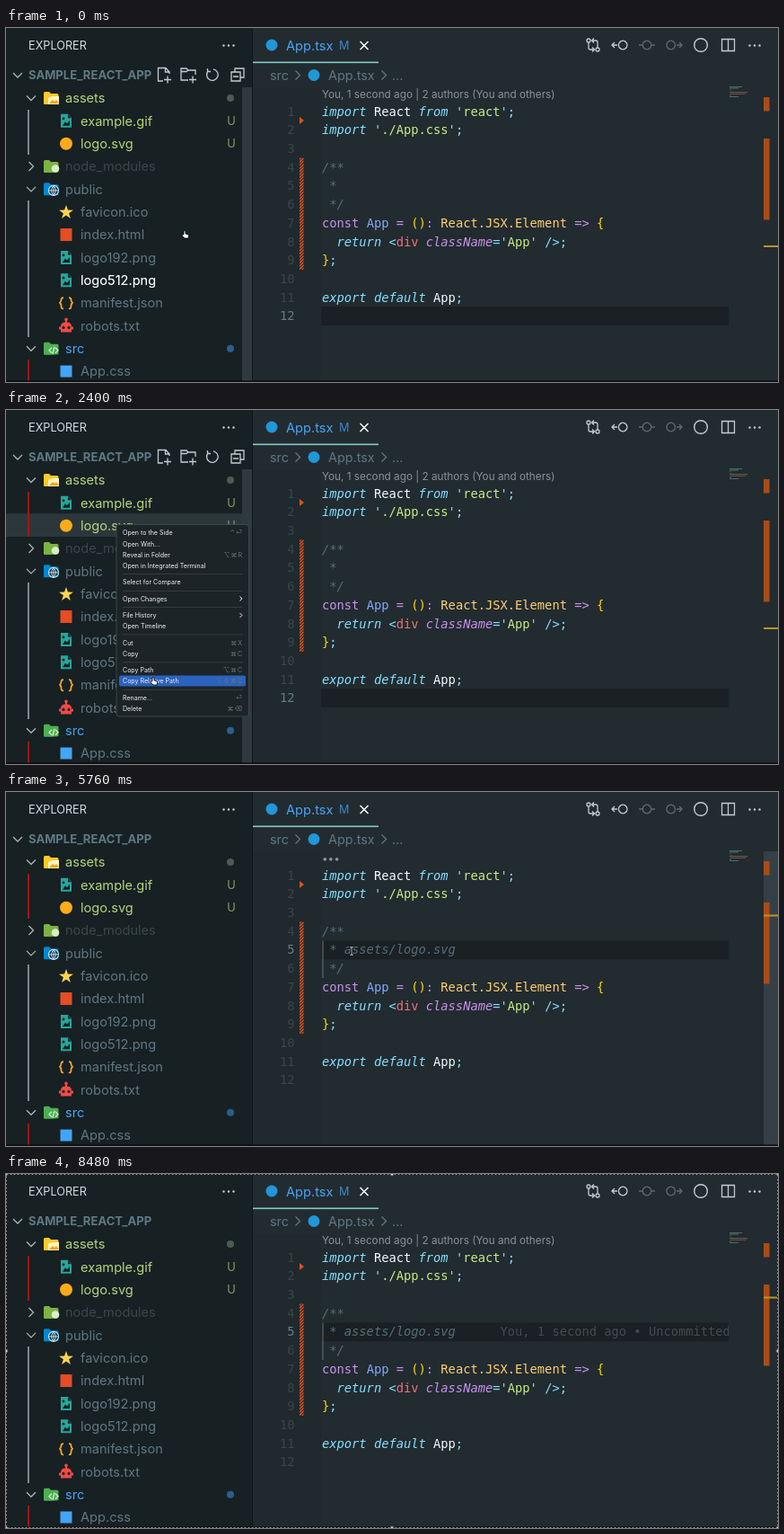
An HTML page for the animation above (8560 ms loop, 860 by 394 pixels).

```html
<!DOCTYPE html>
<html lang="en">
<head>
<meta charset="utf-8">
<style>
html, body { margin: 0; width: 100%; height: 100%; overflow: hidden; background: #222b30; }
svg { display: block; width: 860px; height: 394px; }
text { white-space: pre; font-family: Inter, "Open Sans", sans-serif; }
.code { font-family: "DejaVu Sans Mono", "Noto Sans Mono", monospace; font-size: 13.74px; }
.i { font-style: italic; }
.line { fill: none; stroke: #c3ccd0; stroke-width: 1.3; }
</style>
</head>
<body>
<svg id="stage" viewBox="0 0 860 394"></svg>
<script>
const LOOP = 8560, STEP = 80, COL = 8.272;
const out = [];
const add = s => out.push(s);
const rect = (x, y, w, h, fill, more = '') =>
  add(`<rect x="${x}" y="${y}" width="${w}" height="${h}" fill="${fill}" ${more}/>`);
const dot = (x, y, r, fill, more = '') =>
  add(`<circle cx="${x}" cy="${y}" r="${r}" fill="${fill}" ${more}/>`);
const path = (x, y, d, more = 'class="line"') =>
  add(`<path transform="translate(${x} ${y})" d="${d}" ${more}/>`);
// y is the middle of the capital letters
const text = (x, y, s, size, fill, more = '') =>
  add(`<text x="${x}" y="${y + size * 0.36}" font-size="${size}" fill="${fill}" ${more}>${s}</text>`);
const group = (id, draw) => { add(`<g id="${id}">`); draw(); add('</g>'); };
const right = 'text-anchor="end"', mid = 'text-anchor="middle"';
const chevron = (x, y, open, color = '#a9b5ba') =>
  path(x, y, open ? 'M-5-2.5L0 2.5L5-2.5' : 'M-2.5-5L2.5 0L-2.5 5', `class="line" style="stroke:${color}"`);
const dots = (x, y) => [-5.5, 0, 5.5].forEach(d => dot(x + d, y, 1.2, '#c3ccd0'));
const rowY = i => 78 + 25.34 * i;
const lineY = n => 92.8 + 20.7 * (n - 1);

// Explorer
rect(0, 0, 275, 394, '#172023');
group('picked', () => rect(0, 115.3, 274, 25.7, '#2c373c'));
group('slider', () => rect(263, 66, 11, 328, '#2f3a3f'));
text(25, 19.5, 'EXPLORER', 12.7, '#d3dde1');
dots(248, 19.5);
chevron(13, 52.5, true);
text(25, 52.5, 'SAMPLE_REACT_APP', 13.1, '#5f7a86', 'font-weight="700"');
group('actions', () => {
  path(176, 52, 'M6-1V-3L2-7.5H-6.500V7H-1M1.500-7.500V-3H6M4 1.500V9.500M0 5.500H8');
  path(203, 52, 'M8 0V-5H0L-2-7H-8V6H0M-8-3.500H-2L0-5M5 1.500V9.500M1 5.500H9');
  path(230, 52, 'M-4.500-4.500A6.300 6.300 0 1 0 1-6.200M-5.500-7V-3.500H-2');
  path(258, 52, 'M-3-3V-7H7V3H3M-7-3H3V7H-7ZM-5 2H1');
});

const folder = (y, color) =>
  path(50, y, 'M-8-5.500Q-8-7-6.500-7H-2L0-5H7Q8.500-5 8.500-3.500V6Q8.500 7-7 7Q-8 7-8 6Z', `fill="${color}"`);
const icons = {
  assets: y => {
    folder(y, '#ffca28');
    path(52, y, 'M-1-2H7V7H-5V0Z', 'fill="#fff3c4"');
    path(52, y, 'M-4 6L0 2L2 4L4 2L7 6Z', 'fill="#ffa000"');
  },
  modules: y => { folder(y, '#7cb342'); dot(55, y + 2.5, 4.3, '#dcedc8'); },
  world: y => {
    folder(y, '#0288d1');
    dot(53, y + 1.5, 5.5, '#172023', 'stroke="#b3e5fc" stroke-width="1.2"');
    path(53, y + 1.5, 'M-5.500 0H5.500M0-5.500V5.500M0-5.500Q-5 0 0 5.500M0-5.500Q5 0 0 5.500', 'fill="none" stroke="#b3e5fc"');
  },
  source: y => {
    folder(y, '#4caf50');
    path(53, y + 2, 'M-2-3L-5 0L-2 3M2-3L5 0L2 3M1-4L-1 4', 'fill="none" stroke="#c8e6c9" stroke-width="1.4"');
  },
  image: y => {
    path(67, y, 'M-6-7.500H2L6-3.500V7.500H-6Z', 'fill="#26a69a"');
    path(67, y, 'M2-7V-3H6M-4 5.500L-1 1L1 3L4-0.500V5.500Z', 'fill="#172023"');
    dot(64, y - 2.5, 1.4, '#172023');
  },
  vector: y => dot(67, y, 7, '#ffab1a'),
  star: y => path(67, y, [...Array(10)].map((_, i) => {
    const a = i * Math.PI / 5, r = i % 2 ? 3.3 : 8.3;
    return (i ? 'L' : 'M') + (Math.sin(a) * r).toFixed(1) + ' ' + (0.6 - Math.cos(a) * r).toFixed(1);
  }).join('') + 'Z', 'fill="#ffd54f"'),
  markup: y => rect(60.5, y - 7, 13, 14, '#e44d26'),
  json: y => {
    path(67, y, 'M-3-6Q-5.500-6-5.500-3.500T-7.500 0Q-5.500 0-5.500 3.500T-3 6M3-6Q5.500-6 5.500-3.500T7.500 0Q5.500 0 5.500 3.500T3 6',
      'fill="none" stroke="#f9a825" stroke-width="1.8"');
  },
  robot: y => {
    path(67, y, 'M-1-4V-7H1V-4Q6-4 6 1H8V4H6V7H-6V4H-8V1H-6Q-6-4-1-4Z', 'fill="#f44a45"');
    dot(67, y - 7, 1.8, '#f44a45');
    dot(64, y + 2, 1.6, '#172023');
    dot(70, y + 2, 1.6, '#172023');
  },
  style: y => rect(60.5, y - 6.5, 13, 13, '#42a5f5')
};
const GREEN = '#b4d67c', GREY = '#5f7885', BLUE = '#4aa3f5';
// name, icon, colour, folder state
const rows = [
  ['assets', 'assets', GREEN, 'open'], ['example.gif', 'image', GREEN], ['logo.svg', 'vector', GREEN],
  ['node_modules', 'modules', '#3a474d', 'shut'], ['public', 'world', GREY, 'open'],
  ['favicon.ico', 'star', GREY], ['index.html', 'markup', GREY], ['logo192.png', 'image', GREY],
  ['logo512.png', 'image', GREY], ['manifest.json', 'json', GREY], ['robots.txt', 'robot', GREY],
  ['src', 'source', BLUE, 'open'], ['App.css', 'style', GREY]
];
rows.forEach(([name, icon, color, state], i) => {
  const y = rowY(i);
  if (state) chevron(28, y, state === 'open');
  icons[icon](y);
  text(state ? 66 : 83, y, name, 14.6, color);
});
group('chosen', () => text(83, rowY(8), 'logo512.png', 14.6, '#ffffff'));
[1, 2].forEach(i => text(251, rowY(i), 'U', 12.8, '#829f62', mid));
dot(250, rowY(0), 4, '#4c5c50');
dot(250, rowY(11), 4, '#2c5f8e');
rect(24, 91, 2, 50, '#7f8a8e', 'id="guide"');
rect(24, 192, 2, 152, '#7f8a8e');
rect(24, 369, 2, 25, '#a31515');

// Editor header
rect(275, 0, 585, 394, '#222b30');
rect(275, 66, 76, 328, '#20292e');
rect(274, 0, 1, 394, '#10171a');
const BADGE = '#2196d8';
dot(296, 19, 6.5, BADGE);
text(312, 19.5, 'App.tsx', 14.6, BLUE);
text(371, 19.5, 'M', 12.7, '#3d85cb');
group('close', () => path(399, 19.5, 'M-4.500-4.500L4.500 4.500M4.500-4.500L-4.500 4.500', 'fill="none" stroke="#fff" stroke-width="1.5"'));
group('unsaved', () => dot(399, 19.5, 4.7, '#fff'));
rect(275, 37.5, 140, 1.6, '#80cbc4');
text(294, 52.5, 'src', 14.4, GREY);
chevron(325, 52.5, false, GREY);
dot(343, 52.5, 6.5, BADGE);
text(359, 52.5, 'App.tsx', 14.4, GREY);
chevron(421, 52.5, false, GREY);
text(430, 52.5, '...', 14.4, GREY);

path(654, 19, 'M-5-3V3Q-5 5-3 5H1M-1 2.500L1.500 5L-1 7.500M5 3V-3Q5-5 3-5H-1M1-2.500L-1.500-5L1-7.500');
[[-5, -5], [5, 5]].forEach(([x, y]) => dot(654 + x, 19 + y, 2, '#222b30', 'stroke="#c3ccd0" stroke-width="1.3"'));
path(684, 19, 'M-3 0H-9M-6-3L-9 0L-6 3M8 0A4.800 4.800 0 1 1 8-0.010');
const faint = 'class="line" style="stroke:#5d6a70"';
path(714, 19, 'M-9 0H-4.800M4.800 0H9M4.800 0A4.800 4.800 0 1 1 4.800-0.010', faint);
path(744, 19, 'M3 0H9M6-3L9 0L6 3M1.500 0A4.800 4.800 0 1 1 1.500-0.010', faint);
dot(774, 19, 7.3, 'none', 'stroke="#c3ccd0" stroke-width="1.4"');
path(804.5, 19, 'M-7-6.500H7V6.500H-7ZM0-6.500V6.500');
dots(834, 19.5);

// Code
group('row12', () => rect(351, 310, 454, 21, '#1a2023'));
group('row5', () => {
  rect(351, 165.5, 454, 20.7, '#1a2023');
  rect(352.5, 165.5, 1, 41.5, '#6a757a');
});
const lens = (id, s) => group(id, () => text(352, 74, s, 11.75, '#86949a'));
const authors = ' ago | 2 authors (You and others)';
lens('lensNow', 'You, 1 second' + authors);
lens('lensLater', 'You, 32 seconds' + authors);
lens('lensWait', '•••');

const CYAN = '#84e0ff', TEXT = '#f2fafc', STRING = '#c6ee84', PURPLE = '#c792ea',
  GOLD = '#ffd700', TYPE = '#ffd070', NOTE = '#546e7a';
const code = (n, col, parts) => {
  const spans = parts.map(([s, fill, italic]) =>
    `<tspan fill="${fill}" ${italic ? 'class="i"' : ''}>${s}</tspan>`).join('');
  add(`<text class="code" x="${352 + col * COL}" y="${lineY(n) + 4.8}">${spans}</text>`);
};
const quote = s => [["'", CYAN], [s, STRING], ["'", CYAN]];
code(1, 0, [['import', CYAN, 1], [' React ', TEXT], ['from ', CYAN, 1], ...quote('react'), [';', CYAN]]);
code(2, 0, [['import ', CYAN, 1], ...quote('./App.css'), [';', CYAN]]);
code(4, 0, [['/**', NOTE, 1]]);
code(5, 1, [['*', NOTE, 1]]);
code(6, 1, [['*/', NOTE, 1]]);
code(7, 0, [['const ', PURPLE], ['App ', '#82aaff'], ['= ', PURPLE], ['()', GOLD], [': ', PURPLE],
  ['React.JSX.Element ', TYPE], ['=&gt; ', PURPLE], ['{', GOLD]]);
code(8, 2, [['return ', CYAN, 1], ['&lt;', CYAN], ['div ', '#f07178'], ['className', PURPLE, 1], ['=', CYAN],
  ...quote('App'), [' /&gt;;', CYAN]]);
code(9, 0, [['}', GOLD], [';', CYAN]]);
code(11, 0, [['export default ', CYAN, 1], ['App', TEXT], [';', CYAN]]);
group('pasted', () => code(5, 3, [['assets/logo.svg', NOTE, 1]]));
add('<clipPath id="page"><rect x="351" y="60" width="454" height="334"/></clipPath><g clip-path="url(#page)">');
group('blame', () => code(5, 24, [['You, 1 second ago • Uncommitted changes', '#414d53']]));
add('</g>');
group('wavy', () => path(368, 183, 'M0 0Q1.500-3 3 0T6 0T9 0', 'fill="none" stroke="#e53935" stroke-width="1.2"'));
rect(0, 165.5, 2, 21, '#ffcc00', 'id="caret"');

const NUMBER = '#38464c', ACTIVE = '#647c87';
for (let n = 1; n <= 12; n++)
  add(`<text id="n${n}" class="code" x="321.500" y="${lineY(n) + 4.8}" ${right} fill="${NUMBER}">${n}</text>`);
path(327, 103, 'M0-4L5 0L0 4Z', 'fill="#d9531e"');
add('<clipPath id="bar"><rect x="327" y="144.500" width="4.500" height="124.500"/></clipPath><g clip-path="url(#bar)">');
for (let y = 142; y < 276; y += 3.4) path(326, y, 'M0 5L7-2', 'stroke="#d9531e" stroke-width="1.5"');
add('</g>');

// Minimap and overview ruler
[[0, 14, CYAN], [0, 10, STRING], [0, 2, NOTE], [0, 3, NOTE], [0, 20, TYPE], [1, 17, '#f07178'], [0, 2, GOLD], [0, 10, CYAN]]
  .forEach(([x, w, c], i) => rect(806 + x, 65 + i * 1.6, w, 0.8, c, 'opacity=".45"'));
group('ruler', () => rect(844, 66, 16, 328, '#354046'));
rect(844, 77, 6.5, 15.5, '#a94c18');
rect(844, 123, 6.5, 90.5, '#a94c18');
rect(844, 242, 16, 2, '#bd922a', 'id="mark"');
group('error', () => rect(851, 138, 9, 14.5, '#f0342c'));

// Context menu
const menu = [
  ['Open to the Side', 136.5, '⌃⏎'], ['Open With...', 149], ['Reveal in Folder', 161, '⌥⌘R'],
  ['Open in Integrated Terminal', 173.5], ['Select for Compare', 191.5], ['Open Changes', 210, '>'],
  ['File History', 228.5, '>'], ['Open Timeline', 240.5], ['Cut', 259, '⌘X'], ['Copy', 271, '⌘C'],
  ['Copy Path', 289.5, '⌥⌘C'], ['Copy Relative Path', 301.5, '⌥⇧⌘C'], ['Rename...', 320, '⏎'], ['Delete', 332, '⌘⌫']
];
group('menu', () => {
  rect(123, 127.5, 147.5, 213.5, '#1c2427', 'rx="3" stroke="#454e52" stroke-width=".8"');
  rect(126, 0, 141, 12, '#2b62bd', 'id="hover" rx="2"');
  [182, 201, 219, 249.5, 280.5, 311].forEach(y => rect(130, y, 134, 0.7, '#3d464a'));
  menu.forEach(([s, y, key]) => {
    text(130, y, s, 7.05, '#eef1f2');
    if (key === '>') path(262, y, 'M-1.500-2.500L1 0L-1.500 2.500', 'fill="none" stroke="#eef1f2"');
    else if (key) text(264, y, key, 7, '#6c767a', right + ' letter-spacing="1"');
  });
});

// Pointer
const ink = 'fill="#fff" stroke="#000" stroke-width=".8"';
group('mouse', () => {
  group('hand', () => path(0, 0, 'M-2-4Q-1-5 0-4V-1L3 0Q4 0.500 3.500 2L3 4H-1L-4 1Q-4-1-2 0Z', ink));
  group('beam', () => path(0, 0, 'M-2.500-5H2.500V-3.500H0.800V3.500H2.500V5H-2.500V3.500H-0.800V-3.500H-2.500Z', ink));
});

rect(0, 392.5, 860, 1.5, '#080c0e');
group('frame', () => {
  rect(0.5, 0.5, 859, 393, 'none', 'stroke="#000"');
  rect(0.5, 0.5, 859, 393, 'none', 'stroke="#8d9599" stroke-dasharray="2 2"');
  [0, 430, 860].forEach(x => [0, 197, 394].forEach(y => {
    if (x !== 430 || y !== 197) dot(x, y, 2.2, '#c9ced0', 'stroke="#333"');
  }));
});

const stage = document.getElementById('stage');
stage.innerHTML = out.join('');
const el = id => document.getElementById(id);
const show = (id, on) => { el(id).style.display = on ? '' : 'none'; };
const between = (t, a, b) => t >= a && t < b;

// time, x, y
const route = [
  [240, 200, 230], [1000, 124, 134], [1760, 124, 134], [2320, 165, 302], [2640, 165, 302],
  [3200, 386, 216], [3680, 386, 216], [3840, 385, 177], [6300, 385, 177], [6900, 440, 405]
];
function pointer(t) {
  const k = route.findIndex(p => t < p[0]);
  if (k === 0) return route[0].slice(1);
  if (k < 0) return route[route.length - 1].slice(1);
  const [t0, x0, y0] = route[k - 1], [t1, x1, y1] = route[k];
  const u = (t - t0) / (t1 - t0), e = u * u * (3 - 2 * u);
  return [x0 + (x1 - x0) * e, y0 + (y1 - y0) * e];
}

const OPEN = 1200, CHOOSE = 2560, CLICK = 3920, TYPED = 4400, PASTE = 4880, SAVE = 5440, READY = 6320;
function draw(t) {
  const [x, y] = pointer(t), editing = t >= CLICK;
  el('mouse').setAttribute('transform', `translate(${x} ${y})`);
  show('mouse', !between(t, TYPED, SAVE));
  show('hand', x < 275);
  show('beam', x >= 275);

  show('chosen', t < OPEN);
  show('picked', between(t, 1000, CLICK));
  show('actions', !editing);
  show('slider', !editing);
  el('guide').setAttribute('fill', t < OPEN ? '#7f8a8e' : '#a31515');
  show('menu', between(t, OPEN, CHOOSE));
  const item = x > 128 && menu.find(m => Math.abs(m[1] - y) < 6.2);
  show('hover', item);
  if (item) el('hover').setAttribute('y', item[1] - 6);

  show('row12', !editing);
  show('row5', editing);
  el('n12').setAttribute('fill', editing ? NUMBER : ACTIVE);
  el('n5').setAttribute('fill', editing ? ACTIVE : NUMBER);
  el('mark').setAttribute('y', editing ? 136.5 : 242);
  show('ruler', between(t, CLICK, 6800));
  const dirty = between(t, TYPED, SAVE);
  show('unsaved', dirty);
  show('close', !dirty);
  show('wavy', between(t, 4560, PASTE));
  show('error', between(t, 4560, 5040));
  show('pasted', t >= PASTE);
  show('blame', t >= 6480);
  show('lensLater', dirty);
  show('lensWait', between(t, SAVE, READY));
  show('lensNow', t < TYPED || t >= READY);

  const col = t >= PASTE ? 18 : t >= TYPED ? 3 : 2;
  const since = t - (t >= PASTE ? PASTE + 20 : t >= TYPED ? TYPED : CLICK);
  el('caret').setAttribute('x', 352 + col * COL + 0.3);
  show('caret', editing && (since < 0 || since % 1000 < 500));
  show('frame', t >= 8400);
}

const start = performance.now();
function tick() {
  const t = (performance.now() - start) % LOOP;
  draw(Math.floor(t / STEP) * STEP);
  requestAnimationFrame(tick);
}
tick();
</script>
</body>
</html>
```
